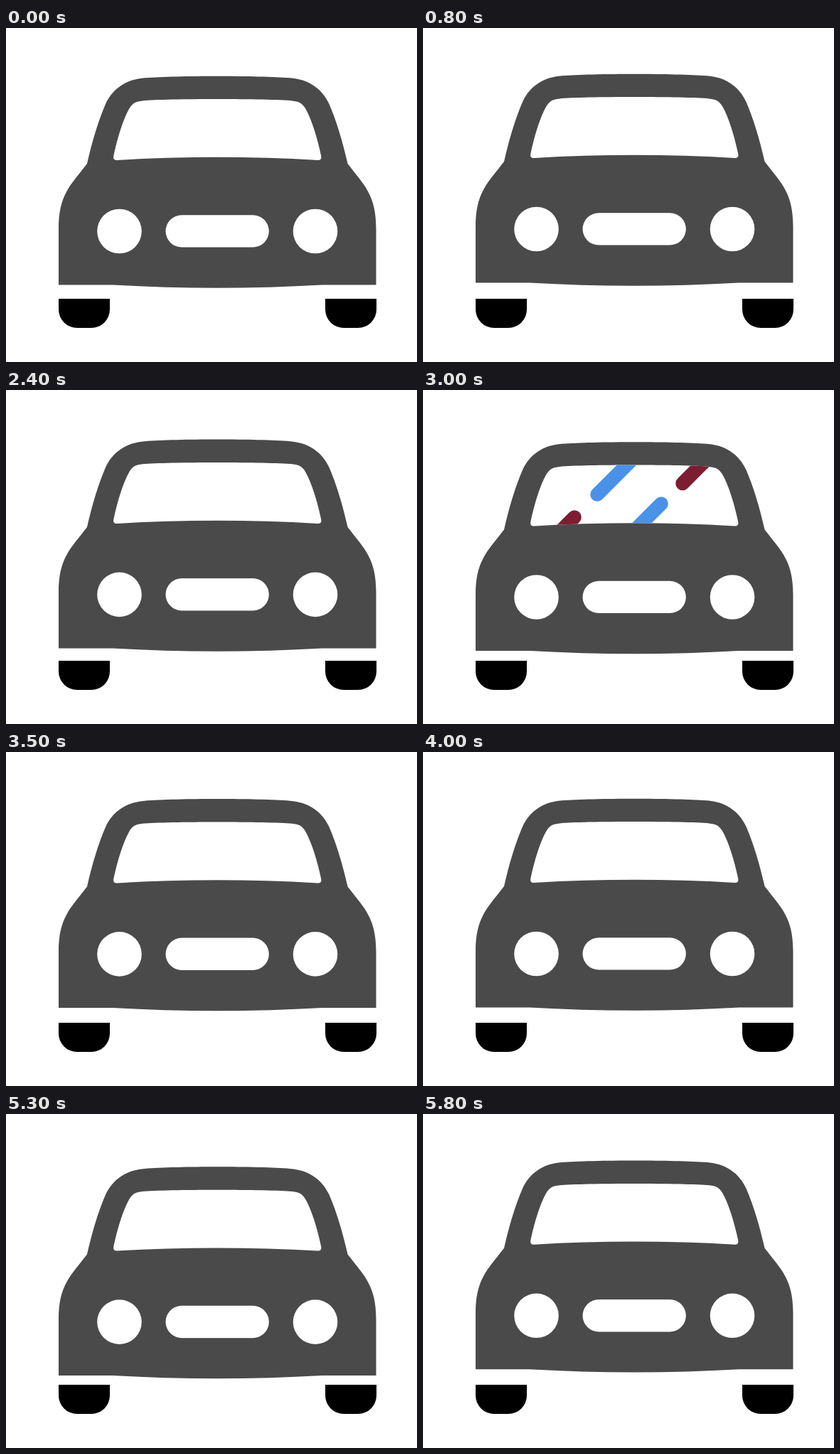
These frames come from a looping animation (578 px wide and 470 px high, 5900 ms). An HTML page with a canvas:

```html
<!DOCTYPE html>
<html lang="en">
<head>
<meta charset="utf-8">
<title>Car</title>
<style>
  html, body { margin: 0; width: 100%; height: 100%; overflow: hidden; background: #fff; }
  canvas { display: block; width: 578px; height: 470px; }
</style>
</head>
<body>
<canvas id="stage" width="578" height="470"></canvas>
<script>
const ctx = document.getElementById('stage').getContext('2d');
const LOOP = 5900, STEP = 100, BOUNCE = 286;
const GREY = '#4a4a4a', BLUE = '#4a92e8', RED = '#7d1d31';
const MID = 297.25;

// Suspension travel over one bounce: [phase, offset]
const travel = [
  [0, 0], [0.06, 1], [0.28, -2.2], [0.49, 5.5], [0.62, 9],
  [0.783, -2.8], [0.797, -3], [0.88, -7], [0.944, -5.7], [0.986, -2], [1, 0]
];
// Streaks on the glass: cap x, cap y, direction along the diagonal, colour
const streaks = [
  [245, 141.5, 1, BLUE], [365, 126, 1, RED],
  [213, 173.5, -1, RED], [335, 154.5, -1, BLUE]
];
const passes = [1500, 3000, 4500];
const STREAK_LEN = 75, STREAK_SPEED = 0.8;

const flip = x => 2 * MID - x;

function bodyPath() {
  const p = new Path2D();
  p.moveTo(74, 361.5);
  p.lineTo(74, 283);
  p.bezierCurveTo(74, 235, 90, 222, 114, 191);
  p.bezierCurveTo(121, 160, 130, 130, 140, 107);
  p.bezierCurveTo(150, 85, 170, 72, 195, 70.3);
  p.bezierCurveTo(240, 66.8, flip(240), 66.8, flip(195), 70.3);
  p.bezierCurveTo(flip(170), 72, flip(150), 85, flip(140), 107);
  p.bezierCurveTo(flip(130), 130, flip(121), 160, flip(114), 191);
  p.bezierCurveTo(flip(90), 222, flip(74), 235, flip(74), 283);
  p.lineTo(flip(74), 361.5);
  p.lineTo(flip(150), 361.5);
  p.quadraticCurveTo(MID, 370, 150, 361.5);
  p.closePath();
  return p;
}

function glassPath() {
  const p = new Path2D();
  p.moveTo(156, 186);
  p.quadraticCurveTo(150, 186, 151.3, 180);
  p.bezierCurveTo(157, 153, 165, 128, 173, 114);
  p.bezierCurveTo(178, 105, 183, 103.5, 192, 102.4);
  p.bezierCurveTo(225, 99.3, flip(225), 99.3, flip(192), 102.4);
  p.bezierCurveTo(flip(183), 103.5, flip(178), 105, flip(173), 114);
  p.bezierCurveTo(flip(165), 128, flip(157), 153, flip(151.3), 180);
  p.quadraticCurveTo(flip(150), 186, flip(156), 186);
  p.quadraticCurveTo(MID, 177.6, 156, 186);
  p.closePath();
  return p;
}

const body = bodyPath(), glass = glassPath();
const lamps = new Path2D();
for (const x of [159.5, 435]) {
  lamps.moveTo(x + 31.3, 286);
  lamps.arc(x, 286, 31.3, 0, Math.PI * 2);
}
lamps.roundRect(224.5, 263.2, 145.3, 45.4, 22.7);
const wheels = new Path2D();
for (const x of [74, 449]) wheels.roundRect(x, 381, 72, 41, [0, 0, 26, 26]);

function fill(path, color) {
  ctx.fillStyle = color;
  ctx.fill(path);
}

function bounce(t) {
  const p = (t / BOUNCE) % 1;
  const i = travel.findIndex(k => k[0] > p);
  const [a, ya] = travel[i - 1], [b, yb] = travel[i];
  return ya + (yb - ya) * (p - a) / (b - a);
}

function drawStreaks(t) {
  const start = passes.find(c => Math.abs(t - c) < 200);
  if (start === undefined) return;
  const shift = (t - start) * STREAK_SPEED;
  ctx.save();
  ctx.clip(glass);
  ctx.lineWidth = 19.5;
  ctx.lineCap = 'round';
  for (const [x, y, dir, color] of streaks) {
    const x0 = x - shift, y0 = y + shift;
    ctx.strokeStyle = color;
    ctx.beginPath();
    ctx.moveTo(x0, y0);
    ctx.lineTo(x0 + dir * STREAK_LEN, y0 - dir * STREAK_LEN);
    ctx.stroke();
  }
  ctx.restore();
}

function draw(t) {
  fill(wheels, '#fff');
  ctx.fillStyle = '#fff';
  ctx.fillRect(0, 0, 578, 470);
  fill(wheels, '#000');
  ctx.save();
  ctx.translate(0, bounce(t));
  fill(body, GREY);
  fill(glass, '#fff');
  drawStreaks(t);
  fill(lamps, '#fff');
  ctx.restore();
}

const began = performance.now();
function tick() {
  const t = (performance.now() - began) % LOOP;
  draw(Math.floor(t / STEP) * STEP);
  requestAnimationFrame(tick);
}
tick();
</script>
</body>
</html>
```
